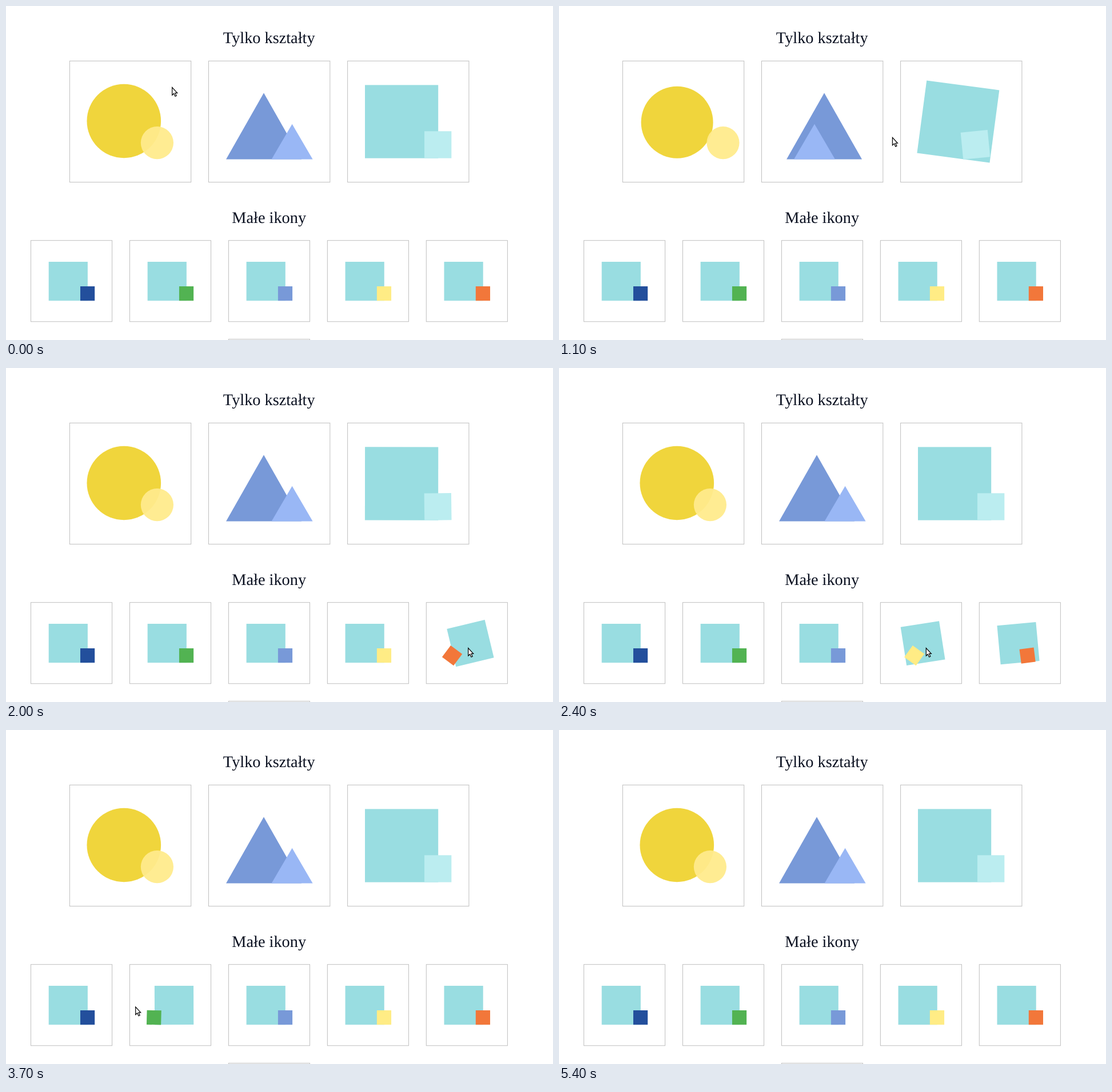
An HTML page for the animation above (5700 ms loop, 957 px wide and 585 px high).

```html
<!DOCTYPE html>
<html lang="pl">
<head>
<meta charset="utf-8">
<title>Kształty</title>
<style>
  html, body { margin: 0; width: 100%; height: 100%; overflow: hidden; background: #fff; }
  svg { display: block; width: 957px; height: 585px; }
  text {
    font: 28.3px "Liberation Serif", "Times New Roman", serif;
    fill: #0a1020; text-anchor: middle; text-rendering: geometricPrecision;
  }
  .card { fill: none; stroke: #bfbfbf; }
</style>
</head>
<body>
<svg id="stage" viewBox="0 0 957 585">
  <text x="460.2" y="65">Tylko kształty</text>
  <text x="460.2" y="380">Małe ikony</text>
</svg>
<script>
const LOOP = 5700;
const TEAL = '#99dde1';
const stage = document.getElementById('stage');
const parts = [];

function add(tag, attrs) {
  const el = document.createElementNS('http://www.w3.org/2000/svg', tag);
  for (const name in attrs) el.setAttribute(name, attrs[name]);
  return stage.appendChild(el);
}

const card = (x, y, size) => add('rect', { class: 'card', x, y, width: size, height: size });

// Each part moves to its hovered pose while the pointer is over the card.
function part(el, hover, cx, cy, move) {
  parts.push({ el, cx, cy, dx: 0, dy: 0, turn: 0, grow: 0, time: 400, back: 0, ...hover, ...move });
}

function circle(cx, cy, r, fill, hover, move, opacity = 1) {
  part(add('circle', { cx, cy, r, fill, opacity }), hover, cx, cy, move);
}

function triangle(cx, top, half, fill, hover, move) {
  const points = `${cx},${top} ${cx + half},268.5 ${cx - half},268.5`;
  part(add('polygon', { points, fill }), hover, cx, (top + 268.5) / 2, move);
}

function square(x, y, size, fill, hover, move) {
  const el = add('rect', { x, y, width: size, height: size, fill });
  part(el, hover, x + size / 2, y + size / 2, move);
}

// Two squares swap sides; the small one spins twice as far, a little slower.
function squares(x, y, size, small, fill, hover) {
  const width = size * 1.1804;
  square(x, y, size, TEAL, hover, { dx: width - size, turn: 360 });
  square(x + width - small, y + size - small, small, fill, hover,
    { dx: small - width - 1.5, turn: -720, time: 423 });
}

for (let i = 0; i < 3; i++) card(111.4 + i * 243.1, 96.3, 212.3);
for (let i = 0; i < 5; i++) card(43.5 + i * 172.95, 410.7, 142.1);
card(389.4, 583.6, 142.1);

const sun = { enter: 10, leave: 720, time: 600, back: 3.4 };
circle(206.3, 201.5, 64.8, '#f0d53c', sun, { dx: -1.3, dy: -9, grow: .115 });
circle(264.4, 239.6, 28.6, '#ffeb8c', sun, { dx: -94 }, .94);

const peak = { enter: 710, leave: 1050 };
triangle(451, 152.3, 66, '#7899d8', peak, { dx: 19.5 });
triangle(500.6, 206.8, 36, '#99b7f5', peak, { dx: -80 });

squares(628, 138.4, 128.2, 47.3, '#bbedf0', { enter: 1060, leave: 1620 });

[
  ['#234f9c', 3750, 4450],
  ['#52b352', 3330, 3740],
  ['#7899d8', 2550, 3250],
  ['#ffec85', 2260, 2560],
  ['#f2773a', 1734, 2247]
].forEach(([fill, enter, leave], i) =>
  squares(74.7 + i * 172.95, 448, 68.2, 25.2, fill, { enter, leave }));

const pointer = add('path', {
  d: 'M.7 .5V14L3.7 11.2L6 16.3L8.2 15.3L6 10.4H9.7Z',
  fill: '#fff', stroke: '#000', 'stroke-width': 1.2
});
const path = [[0, 290, 142], [400, 292, 150], [700, 415, 219], [1400, 708.5, 238],
  [2000, 808, 490], [2500, 600, 490], [3000, 447.5, 489], [3200, 379, 484],
  [3700, 226, 484.5], [3800, 74, 484], [4400, 58, 484], [4800, -6, 280],
  [5000, 30, 107], [5200, 96, -14], [5400, 96, -40]];

// Cubic ease-out, with overshoot when back > 0.
function ease(p, back) {
  const u = Math.min(Math.max(p, 0), 1) - 1;
  return 1 + (back + 1) * u ** 3 + back * u ** 2;
}

function pointerAt(t) {
  const i = path.findIndex(key => key[0] > t);
  if (i < 0) return path[path.length - 1].slice(1);
  const [t0, x0, y0] = path[i - 1], [t1, x1, y1] = path[i];
  const p = (t - t0) / (t1 - t0);
  return [x0 + (x1 - x0) * p, y0 + (y1 - y0) * p];
}

// The screen refreshes in steps and stalls now and then.
function refresh(time) {
  for (const [from, to] of [[100, 300], [2500, 3000], [3800, 4100]]) {
    if (time >= from && time < to) return from;
  }
  const step = time < 4200 ? 100 : 200;
  return Math.floor(time / step) * step;
}

function draw(time) {
  const t = refresh(time);
  for (const p of parts) {
    const k = ease((t - p.enter) / p.time, p.back) * (1 - ease((t - p.leave) / p.time, p.back));
    p.el.setAttribute('transform',
      `translate(${p.cx + p.dx * k} ${p.cy + p.dy * k}) rotate(${p.turn * k}) ` +
      `scale(${1 + p.grow * k}) translate(${-p.cx} ${-p.cy})`);
  }
  pointer.setAttribute('transform', `translate(${pointerAt(t)})`);
}

const start = performance.now();
function tick() {
  draw((performance.now() - start) % LOOP);
  requestAnimationFrame(tick);
}
tick();
</script>
</body>
</html>
```
